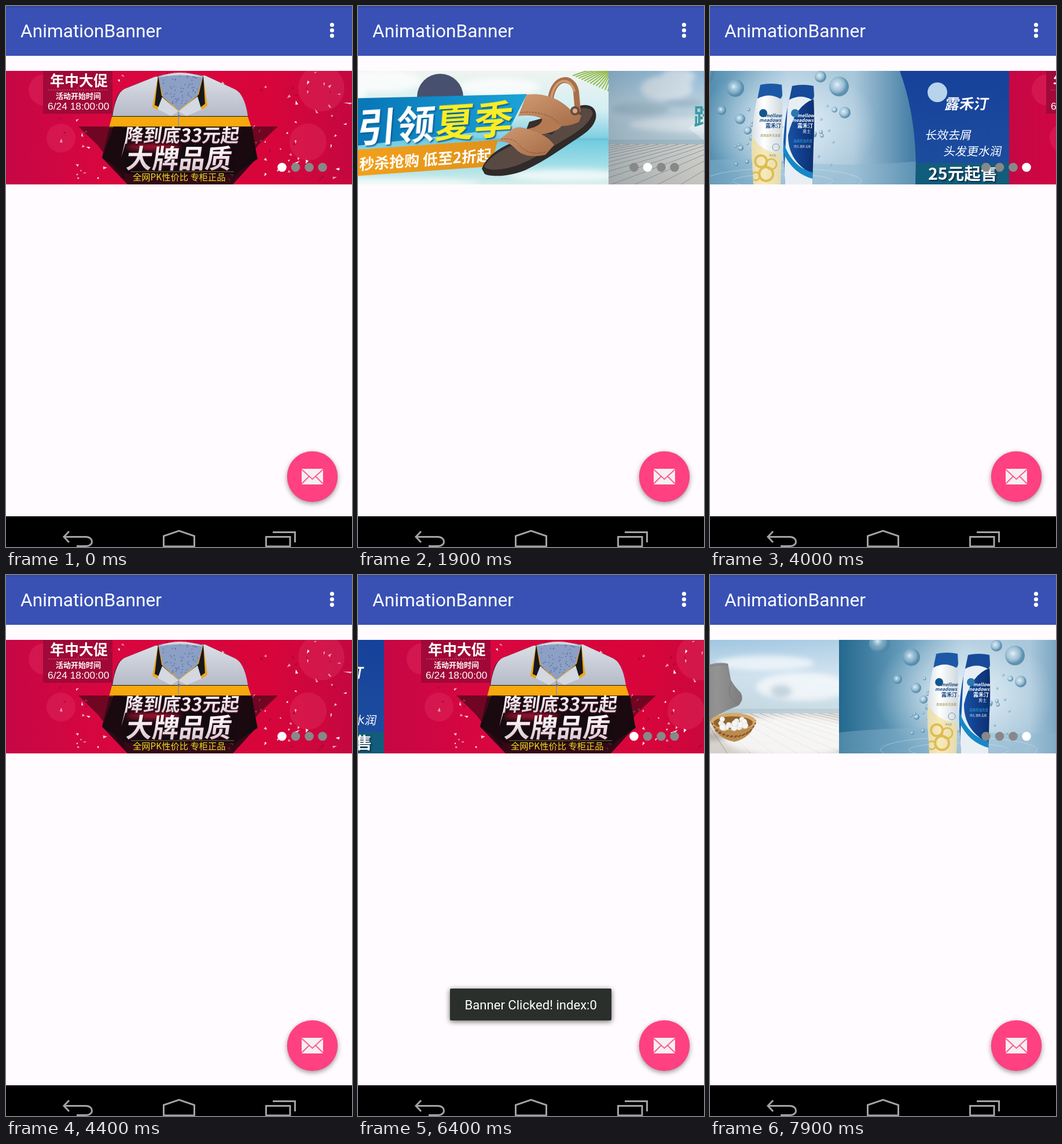
Animation, 598 px wide and 934 px high, one loop 8000 ms. Source, as an HTML page:

```html
<!DOCTYPE html>
<html lang="zh-CN">
<head>
<meta charset="utf-8">
<title>AnimationBanner</title>
<style>
html, body { margin: 0; width: 100%; height: 100%; overflow: hidden; background: #fffbfe; }
#stage { display: block; width: 598px; height: 934px; }
text { font-family: "Noto Sans CJK SC", "Noto Sans CJK", sans-serif; fill: #fff; }
.ui { font-family: Roboto, sans-serif; }
.page { overflow: hidden; }
.heavy { font-weight: 900; }
.bold { font-weight: 700; }
.num { font-family: "Liberation Sans", sans-serif; }
.serif { font-family: "Noto Serif", serif; }
.line { fill: none; stroke: #a5a2a3; stroke-width: 3; }
.soft { filter: blur(5px); }
.shade { filter: drop-shadow(0 3px 4px #0006); }
</style>
</head>
<body>
<svg id="stage" viewBox="0 0 598 934">
  <defs>
    <linearGradient id="bar" x2="0" y2="1">
      <stop offset="0" stop-color="#3347a0"/><stop offset=".06" stop-color="#3951b5"/>
    </linearGradient>
    <linearGradient id="red">
      <stop offset="0" stop-color="#c60745"/><stop offset=".3" stop-color="#d9063f"/>
      <stop offset=".75" stop-color="#d8053b"/><stop offset="1" stop-color="#c4083f"/>
    </linearGradient>
    <linearGradient id="cloth" x2="0" y2="1">
      <stop offset="0" stop-color="#dcdfe7"/><stop offset="1" stop-color="#b5bac8"/>
    </linearGradient>
    <linearGradient id="steel" x2="0" y2="1">
      <stop offset=".2" stop-color="#fff"/><stop offset=".9" stop-color="#d3c8ce"/>
    </linearGradient>
    <linearGradient id="beach" x2="0" y2="1">
      <stop offset="0" stop-color="#eff4f0"/><stop offset=".35" stop-color="#d3eef2"/>
      <stop offset=".62" stop-color="#74cbe0"/><stop offset=".8" stop-color="#9bdde6"/>
      <stop offset="1" stop-color="#d8eeea"/>
    </linearGradient>
    <linearGradient id="ribbon"><stop offset=".2" stop-color="#0878b8"/><stop offset="1" stop-color="#1ba3d8"/></linearGradient>
    <linearGradient id="amber"><stop offset="0" stop-color="#f6a21a"/><stop offset="1" stop-color="#e0921c"/></linearGradient>
    <linearGradient id="tan" x2="1" y2="1"><stop offset="0" stop-color="#d09a72"/><stop offset="1" stop-color="#a56c47"/></linearGradient>
    <linearGradient id="sky" x2="0" y2="1">
      <stop offset="0" stop-color="#94bfdd"/><stop offset=".5" stop-color="#c6dcea"/>
      <stop offset="1" stop-color="#b9d0db"/>
    </linearGradient>
    <linearGradient id="haze">
      <stop offset="0" stop-color="#5f7787" stop-opacity=".4"/><stop offset=".3" stop-color="#8ba0ac" stop-opacity=".12"/>
      <stop offset=".6" stop-color="#fff" stop-opacity=".1"/><stop offset="1" stop-color="#fff" stop-opacity=".25"/>
    </linearGradient>
    <linearGradient id="deck" x2="0" y2="1"><stop offset="0" stop-color="#dad9d5"/><stop offset="1" stop-color="#cfcac2"/></linearGradient>
    <linearGradient id="knit"><stop offset="0" stop-color="#777879"/><stop offset=".6" stop-color="#939394"/><stop offset="1" stop-color="#7d7d7e"/></linearGradient>
    <linearGradient id="water">
      <stop offset="0" stop-color="#24688e"/><stop offset=".17" stop-color="#5f97b6"/>
      <stop offset=".36" stop-color="#aecbdd"/><stop offset=".55" stop-color="#a9c7da"/>
      <stop offset=".72" stop-color="#467fa6"/>
    </linearGradient>
    <radialGradient id="glow"><stop offset="0" stop-color="#f4faff" stop-opacity=".9"/><stop offset="1" stop-color="#e4f1fa" stop-opacity="0"/></radialGradient>
    <radialGradient id="drop" cx=".4" cy=".4">
      <stop offset="0" stop-color="#eef7fc" stop-opacity=".9"/><stop offset=".55" stop-color="#9fc3d8" stop-opacity=".5"/>
      <stop offset="1" stop-color="#4f86a8" stop-opacity=".85"/>
    </radialGradient>
    <linearGradient id="panel" x2="0" y2="1"><stop offset="0" stop-color="#17419a"/><stop offset="1" stop-color="#1d4f9f"/></linearGradient>
    <linearGradient id="white"><stop offset="0" stop-color="#d5dfe6"/><stop offset=".4" stop-color="#fff"/><stop offset="1" stop-color="#cfd8de"/></linearGradient>
    <linearGradient id="navy"><stop offset="0" stop-color="#1a5cae"/><stop offset=".5" stop-color="#124291"/><stop offset="1" stop-color="#0c2f6e"/></linearGradient>
    <path id="bottle" d="M11 18C3 50-3 95 1 135L3 172H50L52 100C54 70 53 40 52 18Z"/>
    <path id="cap" d="M15 0Q34-4 52 0L53 17Q52 24 49 24Q30 13 10 24Z"/>
    <clipPath id="inBottle"><use href="#bottle"/></clipPath>
  </defs>

  <rect width="598" height="934" fill="#fffbfe"/>

  <!-- sale -->
  <svg class="page" y="112" width="598" height="196" viewBox="0 112 598 196">
    <rect y="112" width="598" height="196" fill="url(#red)"/>
    <g fill="#f0507a" opacity=".22">
      <circle cx="545" cy="142" r="40"/><circle cx="522" cy="235" r="32"/>
      <circle cx="66" cy="145" r="27"/><circle cx="95" cy="228" r="25"/>
    </g>
    <g id="shards"></g>
    <rect x="64" y="112" width="120" height="74" fill="#9c0838" opacity=".9"/>
    <text class="heavy" x="76" y="138" font-size="25">年中大促</text>
    <path d="M73 145H177" stroke="#d8688a" stroke-dasharray="2 2"/>
    <text class="bold" x="86" y="160" font-size="13">活动开始时间</text>
    <text class="num" x="72" y="179" font-size="17.4">6/24 18:00:00</text>

    <path d="M258 122L205 143Q190 150 186 178L166 262L210 290H395L435 264L415 178Q410 150 394 143L344 120Z" fill="#141416"/>
    <path d="M258 122L205 143Q190 150 184 190H418Q412 150 394 143L344 120Z" fill="url(#cloth)"/>
    <path d="M183 191H418L424 210H178Z" fill="#f7a80c"/>
    <path d="M263 121Q300 110 341 121L332 158L299 181L268 158Z" fill="#8c9fc4"/>
    <g id="weave" fill="#526a9c"></g>
    <path d="M261 124Q300 106 343 124Q300 115 261 124Z" fill="#d5d5da"/>
    <path d="M263 120L253 174L262 179L298 180L271 156Z" fill="#f2a510"/>
    <path d="M263 120L257 171L270 177L287 172L269 155Z" fill="#17181c"/>
    <path d="M341 120L348 172L338 179L299 180L331 154Z" fill="#f2a510"/>
    <path d="M341 120L344 169L333 177L313 171L333 153Z" fill="#17181c"/>
    <path d="M270 157L298 182L331 156L338 179L312 190L298 182L285 190L262 178Z" fill="#d3d8e1"/>
    <path d="M298 182V207" stroke="#9297a5" stroke-width="2"/>
    <circle cx="299" cy="190" r="2" fill="#666c7c"/>

    <path d="M125 208H200L205 300L158 240ZM470 208H405L392 300L436 240Z" fill="#4a0619" opacity=".72"/>
    <path d="M186 208H425L434 262L392 308H210L166 262Z" fill="#15090f" opacity=".83"/>
    <ellipse class="soft" cx="255" cy="243" rx="48" ry="5" fill="#ff1a45" opacity=".75"/>
    <g style="filter:drop-shadow(1px 2px 1px #400018)">
      <text class="heavy" font-size="32" transform="translate(204 235) skewX(-8)" style="fill:url(#steel)">降到底33元起</text>
      <text class="heavy" font-size="45.5" transform="translate(206 280) skewX(-8)" style="fill:url(#steel)">大牌品质</text>
    </g>
    <path d="M211 213L199 262L207 235Z" fill="#fff"/>
    <path d="M216 286H394" stroke="#a9a33c" stroke-width=".7"/>
    <text x="219" y="301" font-size="15.3" style="fill:#e8e020">全网PK性价比 专柜正品</text>
  </svg>

  <!-- summer -->
  <svg class="page" y="112" width="598" height="196" viewBox="-165 112 598 196">
    <rect x="-165" y="112" width="598" height="196" fill="url(#beach)"/>
    <g class="soft" fill="#fff" opacity=".7">
      <ellipse cx="245" cy="140" rx="70" ry="16"/><ellipse cx="-60" cy="150" rx="75" ry="20"/>
      <ellipse cx="40" cy="130" rx="70" ry="18"/>
      <ellipse cx="360" cy="292" rx="100" ry="10"/><ellipse cx="30" cy="306" rx="180" ry="8"/>
    </g>
    <path d="M-165 228H433V232H-165Z" fill="#55b4ca" opacity=".4"/>
    <g id="palm" fill="none" stroke="#8db94b" stroke-width="2" stroke-linecap="round"></g>
    <circle cx="142" cy="157" r="40" fill="#47506f"/>
    <path d="M-30 160L292 152L262 211L-52 247Z" fill="url(#ribbon)"/>
    <path d="M-28 250L242 231L229 277L-40 296Z" fill="url(#amber)"/>
    <g transform="translate(-3 236) rotate(-3.5) skewX(-8)" style="filter:drop-shadow(2px 2px 1px #05568c)">
      <text class="heavy" font-size="67.5">引领<tspan fill="#fbed24">夏季</tspan></text>
    </g>
    <text class="bold" font-size="26" transform="translate(2 283) rotate(-4) skewX(-6)">秒杀抢购 低至2折起</text>

    <path d="M214 281C221 262 240 247 262 238L330 213C350 200 360 180 384 172C403 168 414 178 411 194C407 211 390 222 371 234C347 250 318 270 290 283C265 294 230 296 219 290Z" fill="#302a29"/>
    <path d="M218 277C228 259 255 244 280 236L335 214C355 200 365 183 384 177C399 174 408 180 405 188C397 207 375 220 348 236C315 256 290 272 262 279C240 284 224 284 218 277Z" fill="#594943"/>
    <path d="M333 160C338 120 372 119 377 148L380 183" fill="none" stroke="#a96f49" stroke-width="10"/>
    <path d="M334 158C340 123 368 121 374 148" fill="none" stroke="#cf9b72" stroke-width="4"/>
    <path d="M296 200L318 194L350 207L335 222L290 216Z" fill="#382d2a"/>
    <path d="M277 190L291 153C320 149 350 159 370 182L386 189L382 200C362 210 344 208 330 203C317 190 298 187 277 190Z" fill="url(#tan)"/>
    <path d="M318 193C334 197 344 202 352 207C344 219 312 225 284 222L270 214C296 214 320 208 318 193Z" fill="#b47a52"/>
    <path d="M240 234L268 212Q278 206 294 213Q327 222 339 240L324 257Q287 265 271 245Q258 232 240 234Z" fill="url(#tan)"/>
    <path d="M281 184C310 180 335 190 347 202M248 230Q269 226 281 243Q298 259 325 252" fill="none" stroke="#7b4c31" stroke-dasharray="3 2"/>
    <circle cx="375" cy="181" r="8" fill="#6f4c38"/><circle cx="375" cy="181" r="4" fill="#c9ad94"/>
  </svg>

  <!-- socks -->
  <svg class="page" y="112" width="598" height="196" viewBox="-35 112 598 196">
    <rect x="-35" y="112" width="598" height="127" fill="url(#sky)"/>
    <g class="soft" fill="#fff" opacity=".65">
      <ellipse cx="65" cy="142" rx="45" ry="22"/><ellipse cx="85" cy="122" rx="30" ry="14"/>
      <ellipse cx="250" cy="160" rx="42" ry="20"/><ellipse cx="435" cy="152" rx="85" ry="13"/>
      <ellipse cx="150" cy="205" rx="150" ry="14"/><ellipse cx="500" cy="193" rx="80" ry="24"/>
    </g>
    <g class="soft" fill="#86a5b8" opacity=".5">
      <ellipse cx="463" cy="201" rx="18" ry="11"/><ellipse cx="20" cy="178" rx="50" ry="11"/>
      <ellipse cx="270" cy="185" rx="38" ry="7"/><ellipse cx="95" cy="168" rx="35" ry="6"/>
    </g>
    <path d="M-35 231H563V240H-35Z" fill="#a9c1cc"/>
    <rect x="-35" y="239" width="598" height="69" fill="url(#deck)"/>
    <g id="planks" stroke="#827a70" opacity=".75"></g>
    <ellipse class="soft" cx="480" cy="278" rx="120" ry="35" fill="#fff" opacity=".75"/>
    <rect x="-35" y="112" width="598" height="196" fill="url(#haze)"/>
    <path d="M182 148L262 211L182 272L103 211Z" fill="#fff" opacity=".3"/>
    <g class="heavy">
      <text x="112" y="206" font-size="40" style="fill:#3b9ca4">踏</text>
      <text font-size="37" transform="translate(145 237) rotate(5)" style="fill:#3b9ca4">寻</text>
    </g>
    <text class="serif" x="163" y="199" font-size="13.5" style="fill:#a7b1b6">SUMMER STYLE</text>
    <text class="bold" x="182" y="209" font-size="8.5" style="fill:#6f7d84">纯棉舒适透气休闲男袜</text>
    <g font-size="4.6">
      <text class="serif" x="187" y="217" style="fill:#929fa5">Soft cotton for warm days</text>
      <text class="serif" x="187" y="223" style="fill:#929fa5">light and airy every step</text>
      <text class="serif" x="196" y="229" style="fill:#929fa5">made for summer</text>
    </g>
    <text class="serif" x="139" y="283" font-size="7" style="fill:#468e96">RMB:</text>
    <text class="heavy" x="157" y="281" font-size="23" style="fill:#208b95">19</text>
    <text class="bold" x="183" y="286" font-size="15" style="fill:#468e96">5</text>
    <text x="191" y="284" font-size="7" style="fill:#468e96">双礼盒装</text>

    <ellipse class="soft" cx="327" cy="279" rx="42" ry="6" fill="#847c72" opacity=".5"/>
    <path d="M328 160Q348 148 371 153L376 181Q382 192 393 203Q400 216 388 226Q371 232 355 241Q341 249 331 266Q318 281 298 278Q284 275 289 262Q298 246 315 231Q334 214 335 197Z" fill="url(#knit)"/>
    <path d="M328 162Q349 152 371 156M377 184Q365 211 391 224M292 260Q307 254 320 274" fill="none" stroke="#68696b" opacity=".6"/>
    <path d="M341 250Q349 282 382 288Q413 281 420 250Z" fill="#bc8a4c"/>
    <ellipse cx="380" cy="253" rx="39" ry="15" fill="#d5aa6d"/>
    <ellipse cx="380" cy="255" rx="34" ry="11" fill="#91642f"/>
    <path d="M343 255Q355 278 382 278T419 255M349 268Q382 292 413 267" fill="none" stroke="#7f5429" stroke-width="2" stroke-dasharray="4 3"/>
    <g id="cotton" fill="#f6f6f3" stroke="#cfd0cf" stroke-width=".6"></g>
  </svg>

  <!-- shampoo -->
  <svg class="page" y="112" width="598" height="196" viewBox="-81 112 598 196">
    <rect x="-81" y="112" width="598" height="196" fill="url(#water)"/>
    <ellipse cx="135" cy="205" rx="155" ry="110" fill="url(#glow)"/>
    <path d="M-81 272Q40 259 140 269T360 268V308H-81Z" fill="#8bb4cc" opacity=".4"/>
    <g fill="none" stroke="#e6f3fa" opacity=".4">
      <ellipse cx="126" cy="302" rx="86" ry="12"/><ellipse cx="126" cy="302" rx="135" ry="22"/>
    </g>
    <g id="bubbles" fill="url(#drop)"></g>
    <path d="M328 112H517V308H355Q360 200 328 112Z" fill="url(#panel)"/>
    <path d="M356 271H517V308H355Z" fill="#125c7c"/>

    <g transform="translate(72 136)">
      <use href="#bottle" fill="url(#white)"/>
      <g clip-path="url(#inBottle)" fill="none" stroke="#dfbd55">
        <path d="M-4 80Q15 120 54 118V180H-5Z" fill="#f2dc8d" stroke="none" opacity=".6"/>
        <circle cx="16" cy="132" r="10" stroke-width="4"/><circle cx="34" cy="137" r="9" stroke-width="3"/>
        <circle cx="25" cy="154" r="12" stroke-width="4"/><circle cx="7" cy="158" r="7" stroke-width="3"/>
      </g>
      <use href="#cap" fill="#1c58a6"/>
      <circle cx="20" cy="49" r="7" fill="#14568b"/>
      <text class="bold" x="23" y="56" font-size="8" font-style="italic" style="fill:#174a86">mellow</text>
      <text class="bold" x="13" y="64" font-size="8" font-style="italic" style="fill:#174a86">meadows</text>
      <text class="bold" x="24" y="74" font-size="9" style="fill:#174a86">露禾汀</text>
      <text x="15" y="89" font-size="5" style="fill:#9c8b40">柔顺滋养洗发露</text>
      <circle cx="42" cy="108" r="6" fill="none" stroke="#6f91ad"/>
      <text x="30" y="124" font-size="4" style="fill:#718896">净含量</text>
    </g>
    <g transform="translate(127 138)">
      <use href="#bottle" fill="url(#navy)"/>
      <g clip-path="url(#inBottle)">
        <path d="M8 16H55V22Q20 32 8 85Q7 130 51 153V174H0Z" fill="#e7eff5"/>
        <path d="M-3 87Q10 140 53 150V161Q12 151-3 108Z" fill="#1687c7"/>
      </g>
      <use href="#cap" fill="#174a98"/>
      <circle cx="20" cy="47" r="7" fill="#2d76ae"/>
      <g fill="#dbe7f3">
        <text class="bold" x="24" y="54" font-size="8" font-style="italic">mellow</text>
        <text class="bold" x="14" y="62" font-size="8" font-style="italic">meadows</text>
        <text class="bold" x="24" y="72" font-size="9">露禾汀</text>
        <text x="33" y="81" font-size="7">男士</text>
      </g>
      <text x="17" y="97" font-size="5.5" style="fill:#31b0e4">清爽控油洗发</text>
      <text x="18" y="106" font-size="4.5">持久 清新 去屑</text>
    </g>

    <circle cx="393" cy="149" r="17" fill="#b8d3ec"/>
    <text class="heavy" font-size="25" transform="translate(405 178) skewX(-10)">露禾汀</text>
    <text font-size="20" transform="translate(371 230) skewX(-10)">长效去屑</text>
    <text font-size="20" transform="translate(403 258) skewX(-10)">头发更水润</text>
    <text class="bold" x="377" y="300" font-size="28.5" style="filter:drop-shadow(2px 2px 1px #0b2c40)">25元起售</text>
  </svg>

  <g id="dots"></g>

  <rect width="598" height="86" fill="url(#bar)"/>
  <text class="ui" x="25" y="54" font-size="31.7">AnimationBanner</text>
  <g fill="#fff"><circle cx="563.5" cy="32.5" r="3.6"/><circle cx="563.5" cy="42" r="3.6"/><circle cx="563.5" cy="51.3" r="3.6"/></g>

  <g id="toast">
    <rect x="159" y="714" width="279" height="55" rx="2" fill="#2a2f2b" style="filter:drop-shadow(0 2px 5px #0009)"/>
    <text class="ui" x="184.5" y="750" font-size="22.1">Banner Clicked! index:0</text>
  </g>

  <circle class="shade" cx="529.5" cy="812.5" r="43.8" fill="#ff4081"/>
  <rect x="511" y="799" width="37" height="27" fill="#f4f0f1"/>
  <path d="M511 800L529.5 817L548 800M511 825L524 812M548 825L535 812" fill="none" stroke="#ff5c92" stroke-width="2"/>

  <rect y="881" width="598" height="53" fill="#000"/>
  <g class="line">
    <path d="M109 907L100 916.5L109 926M100 916.5H138C152 917 152 932.5 138 932.5H122"/>
    <path d="M272.5 933V915L299 906L325.5 915V933Z"/>
    <path d="M449.5 916.5H491V933H449.5ZM461 908.5H499.5V926"/>
  </g>
</svg>
<script>
const W = 598, LOOP = 8000;
const $ = id => document.getElementById(id);
const pages = [...document.querySelectorAll('.page')];

// [time in ms, scroll in px]; every value holds until the next one
const scroll = [
  [0, 0], [800, 30], [900, 95], [1000, 200], [1100, 400], [1200, 555], [1300, W],
  [1900, W + 165], [2100, W + 410], [2200, W + 565], [2300, 2 * W],
  [3000, 2 * W + 35], [3100, 2 * W + 190], [3300, 2 * W + 520], [3400, 3 * W],
  [4000, 3 * W + 81], [4100, 3 * W + 230], [4200, 3 * W + 440], [4300, 3 * W + 565], [4400, 4 * W],
  [6400, 4 * W - 45], [6500, 4 * W - 165], [6600, 4 * W - 310], [6700, 4 * W - 433],
  [6800, 4 * W - 560], [6900, 3 * W], [7800, 3 * W - 75], [7900, 3 * W - 223]
];
const rests = scroll.filter(s => s[1] % W === 0);
const fade = [[0, 0], [5500, .37], [5600, .65], [5700, .9], [5800, 1], [7100, .8], [7300, .35], [7500, 0]];

const at = (steps, t) => steps.findLast(s => s[0] <= t)[1];
const mod = (a, n) => ((a % n) + n) % n;

let seed = 17;
const rnd = (a, b) => {
  seed = (seed * 16807) % 2147483647;
  return a + (b - a) * seed / 2147483647;
};

function add(parent, tag, attrs) {
  const el = document.createElementNS('http://www.w3.org/2000/svg', tag);
  for (const k in attrs) el.setAttribute(k, attrs[k]);
  return $(parent).appendChild(el);
}
const circle = (parent, cx, cy, r) => add(parent, 'circle', { cx, cy, r });

for (let i = 0; i < 130; i++) {
  const x = rnd(90, 590), y = rnd(112, 306), a = rnd(0, 6.3), len = rnd(3, i % 5 ? 8 : 18), wide = rnd(2, 5);
  const c = Math.cos(a), s = Math.sin(a);
  add('shards', 'path', {
    d: `M${x} ${y}l${len * c} ${len * s}l${-wide * s - 2 * c} ${wide * c - 2 * s}z`,
    fill: ['#fff', '#f6c9d2', '#e9a3b0', '#a30a35'][i % 4]
  });
}
for (let i = 0; i < 60; i++) {
  const y = rnd(120, 170), half = 33 - Math.max(0, y - 145) * .9;
  circle('weave', 300 + rnd(-half, half), y, .9);
}
for (let i = 0; i < 16; i++) {
  const x = 372 + i * 5, y = 113 + i * 2.2;
  add('palm', 'path', { d: `M440 104Q${(x + 440) / 2} ${y - 6} ${x} ${y + 7}` });
}
for (let i = -24; i <= 24; i++)
  add('planks', 'path', { d: `M${290 + i * 17} 239L${290 + i * 40} 308` });
for (let i = 0; i < 22; i++) {
  const y = rnd(249, 264);
  circle('cotton', 380 + rnd(-22, 22), y, rnd(4, 5.5));
}

[[44, 142, 15], [223, 139, 17], [191, 122, 10], [-11, 118, 18], [52, 195, 9], [233, 184, 10],
 [215, 179, 5], [65, 215, 7], [72, 228, 5], [53, 245, 5], [20, 180, 8]].forEach(b => circle('bubbles', ...b));
for (let i = 0; i < 45; i++) circle('bubbles', rnd(35, 220), rnd(165, 285), rnd(1, 3.5));

const dots = [477, 500.5, 524, 547].map(x => circle('dots', x, 278.5, 7.8));

const start = performance.now();
function draw() {
  const t = (performance.now() - start) % LOOP;
  const pos = at(scroll, t), rest = at(rests, t);
  pages.forEach((page, i) => page.setAttribute('x', mod(i * W - pos + W, 4 * W) - W));
  // the dot moves on once three quarters of the way are done
  const current = mod(rest / W + Math.trunc((pos - rest) / (W * .75)), 4);
  dots.forEach((dot, i) => dot.setAttribute('fill', i === current ? '#fff' : '#888'));
  $('toast').setAttribute('opacity', at(fade, t));
  requestAnimationFrame(draw);
}
draw();
</script>
</body>
</html>
```
